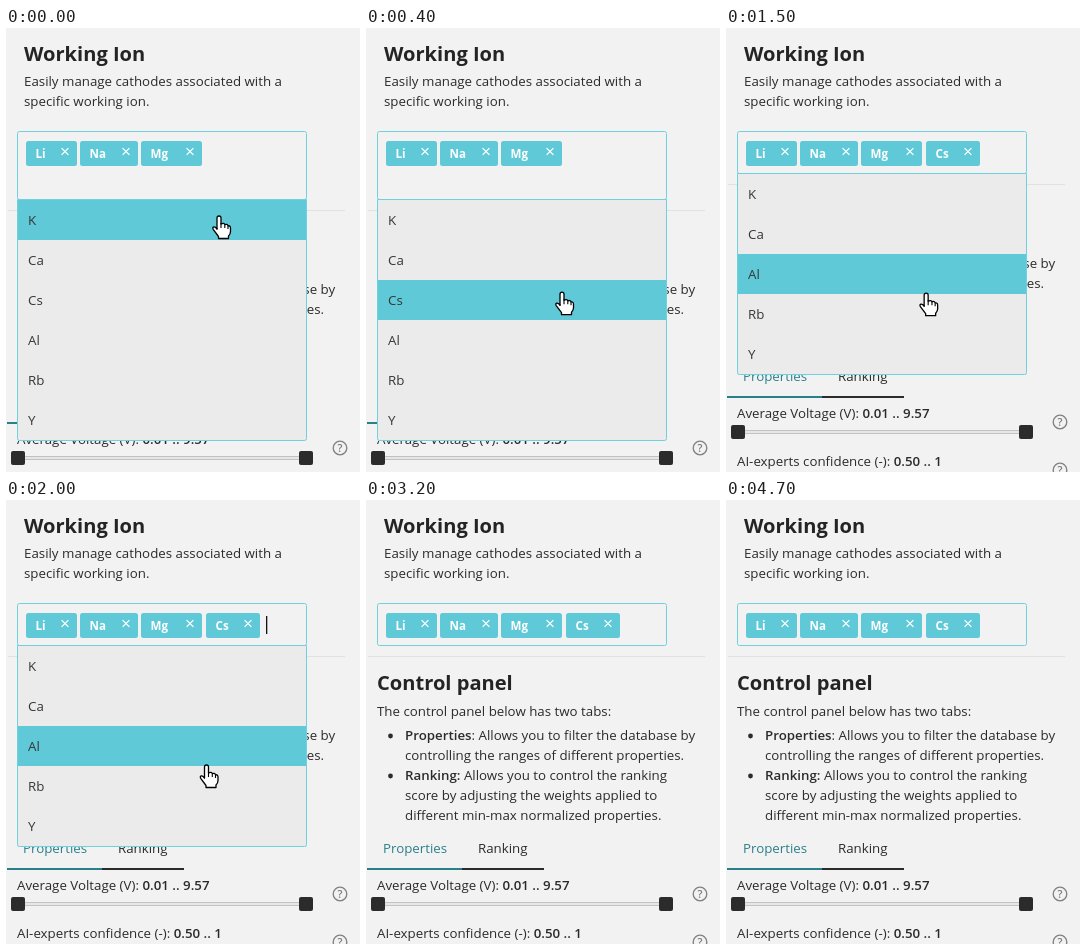
These frames come from a looping animation (354 by 444 pixels, 4.8 s). An HTML page with a canvas:

```html
<!DOCTYPE html>
<html lang="en">
<head>
<meta charset="utf-8">
<title>Working Ion</title>
<style>
html, body { margin: 0; width: 100%; height: 100%; overflow: hidden; background: #f2f2f2; }
canvas { display: block; width: 354px; height: 444px; }
</style>
</head>
<body>
<canvas id="stage"></canvas>
<script>
const W = 354, H = 444, LOOP = 4800, STEP = 100;
const SELECT_AT = 1100, CLOSE_AT = 2500, LEAVE_AT = 3200;
const BLINK = 1060;
const BG = '#f2f2f2', TEAL = '#5fc9d8', INK = '#2b2b2b', LINK = '#2b7f88';
const FAMILY = '"Open Sans", "Noto Sans", sans-serif';
const SIZE = 13.3, ROW = 40;

const canvas = document.getElementById('stage');
const ctx = canvas.getContext('2d');
const dpr = window.devicePixelRatio || 1;
canvas.width = W * dpr;
canvas.height = H * dpr;

// Pointer stops: time, x, y of the fingertip
const stops = [[0, 213, 188], [200, 204, 234], [500, 195, 268], [1200, 195, 268], [1600, 200.5, 265]];

const hand = new Path2D('M-2 2Q-2 0 0 0Q2 0 2 2V8Q5 6.6 5.8 8.6Q8.4 7.6 9 9.8Q11.5 9.4 11.5 12' +
  'V15.5Q11.5 18 9.5 20V22.5H-.5V20.5L-5.6 13.6Q-7 11.5 -5.2 10.9Q-3.8 10.6 -2 13Z');
const knuckles = new Path2D('M-2 12V13.5M2 7V12M5.8 8.8V12M9 10V13');

function rect(x, y, w, h, color) {
  ctx.fillStyle = color;
  ctx.fillRect(x, y, w, h);
}

function roundRect(x, y, w, h, r, color) {
  ctx.beginPath();
  ctx.roundRect(x, y, w, h, r);
  ctx.fillStyle = color;
  ctx.fill();
}

function frameRect(x, y, w, h, r) {
  ctx.beginPath();
  ctx.roundRect(x + 0.5, y + 0.5, w - 1, h - 1, r);
  ctx.strokeStyle = '#70d0dd';
  ctx.lineWidth = 1;
  ctx.stroke();
}

// Draws text and returns the x where it ends
function text(str, x, y, { size = SIZE, weight = 400, color = INK } = {}) {
  ctx.font = `${weight} ${size}px ${FAMILY}`;
  ctx.fillStyle = color;
  ctx.fillText(str, x, y);
  return x + ctx.measureText(str).width;
}

const bold = (str, x, y) => text(str, x, y, { weight: 600 });
const title = (str, x, y) => text(str, x, y, { size: 20.1, weight: 700, color: '#242424' });

function dot(x, y, r) {
  ctx.beginPath();
  ctx.arc(x, y, r, 0, Math.PI * 2);
  ctx.fillStyle = INK;
  ctx.fill();
}

function help(x, y) {
  ctx.beginPath();
  ctx.arc(x, y, 6.8, 0, Math.PI * 2);
  ctx.strokeStyle = '#808080';
  ctx.lineWidth = 1.3;
  ctx.stroke();
  ctx.textAlign = 'center';
  text('?', x, y + 4, { size: 11, weight: 600, color: '#808080' });
  ctx.textAlign = 'left';
}

function header() {
  title('Working Ion', 18, 33);
  text('Easily manage cathodes associated with a', 18, 58);
  text('specific working ion.', 18, 78);
}

function panel() {
  rect(2, 156, 337, 1, '#e1e1e1');
  title('Control panel', 11, 190);
  text('The control panel below has two tabs:', 11, 216);
  dot(24.5, 236, 2.4);
  text(': Allows you to filter the database by', bold('Properties', 39, 240), 240);
  text('controlling the ranges of different properties.', 39, 260);
  dot(24.5, 276, 2.4);
  text(' Allows you to control the ranking', bold('Ranking:', 39, 280), 280);
  text('score by adjusting the weights applied to', 39, 300);
  text('different min-max normalized properties.', 39, 320);

  text('Properties', 17, 353, { color: LINK });
  text('Ranking', 112, 353);
  rect(1, 368, 95, 2, LINK);
  rect(96, 368, 82, 2, INK);

  bold('0.01 .. 9.57', text('Average Voltage (V): ', 11, 390), 390);
  rect(12, 402, 288, 4, '#c2c2c2');
  rect(12, 403, 288, 2, '#e6e6e6');
  roundRect(5, 397, 14, 14, 2, INK);
  roundRect(293, 397, 14, 14, 2, INK);
  help(334, 394);

  bold('0.50 .. 1', text('AI-experts confidence (-): ', 11, 438), 438);
  help(334, 442);
}

function chip(label, x, w) {
  roundRect(x, 113, w, 25, 2.5, TEAL);
  text(label, x + 9.5, 130, { size: 11.6, weight: 700, color: '#fff' });
  const cx = x + w - 12, cy = 123.5, r = 3.4;
  ctx.beginPath();
  ctx.moveTo(cx - r, cy - r);
  ctx.lineTo(cx + r, cy + r);
  ctx.moveTo(cx + r, cy - r);
  ctx.lineTo(cx - r, cy + r);
  ctx.strokeStyle = '#fff';
  ctx.lineWidth = 1.3;
  ctx.stroke();
}

function menu(items, top, active) {
  const h = items.length * ROW;
  rect(11, top, 290, h + 1, '#ebebeb');
  rect(12, top + active * ROW, 288, ROW, TEAL);
  frameRect(11, top - 1, 290, h + 2, [0, 0, 2, 2]);
  items.forEach((name, i) => text(name, 22, top + i * ROW + 25, { color: '#363636' }));
}

function pointerAt(t) {
  let i = 0;
  while (i < stops.length - 2 && t >= stops[i + 1][0]) i++;
  const [t0, x0, y0] = stops[i], [t1, x1, y1] = stops[i + 1];
  const p = Math.min(1, (t - t0) / (t1 - t0));
  const k = i ? 1 - (1 - p) ** 2 : p;
  return { x: x0 + (x1 - x0) * k, y: y0 + (y1 - y0) * k };
}

function pointer({ x, y }) {
  ctx.save();
  ctx.translate(x, y);
  ctx.lineJoin = 'round';
  ctx.lineWidth = 1.3;
  ctx.strokeStyle = '#000';
  ctx.fillStyle = '#fff';
  ctx.fill(hand);
  ctx.stroke(hand);
  ctx.lineWidth = 1.1;
  ctx.stroke(knuckles);
  ctx.restore();
}

function draw(t) {
  const picked = t >= SELECT_AT;
  const shift = picked ? 0 : 26;
  const tip = pointerAt(t);

  ctx.setTransform(dpr, 0, 0, dpr, 0, 0);
  rect(0, 0, W, H, BG);
  header();

  ctx.save();
  ctx.translate(0, shift);
  panel();
  ctx.restore();

  rect(11, 103, 290, 43 + shift, BG);
  frameRect(11, 103, 290, 43 + shift, 2);
  chip('Li', 20, 51);
  chip('Na', 74, 58);
  chip('Mg', 135, 61);
  if (picked) {
    chip('Cs', 200, 54);
    const phase = (t - 470 + BLINK) % BLINK;
    if (phase < BLINK / 2) rect(260, 116, 1.3, 18, '#111');
  }

  if (t < CLOSE_AT) {
    const top = 146 + shift;
    const items = ['K', 'Ca', 'Cs', 'Al', 'Rb', 'Y'].filter(n => !picked || n !== 'Cs');
    const active = picked ? 2 : Math.floor((tip.y - top) / ROW);
    menu(items, top, active);
  }
  if (t < LEAVE_AT) pointer(tip);
}

const start = performance.now();
function tick() {
  const t = (performance.now() - start) % LOOP;
  draw(Math.floor(t / STEP) * STEP);
  requestAnimationFrame(tick);
}
tick();
</script>
</body>
</html>
```
